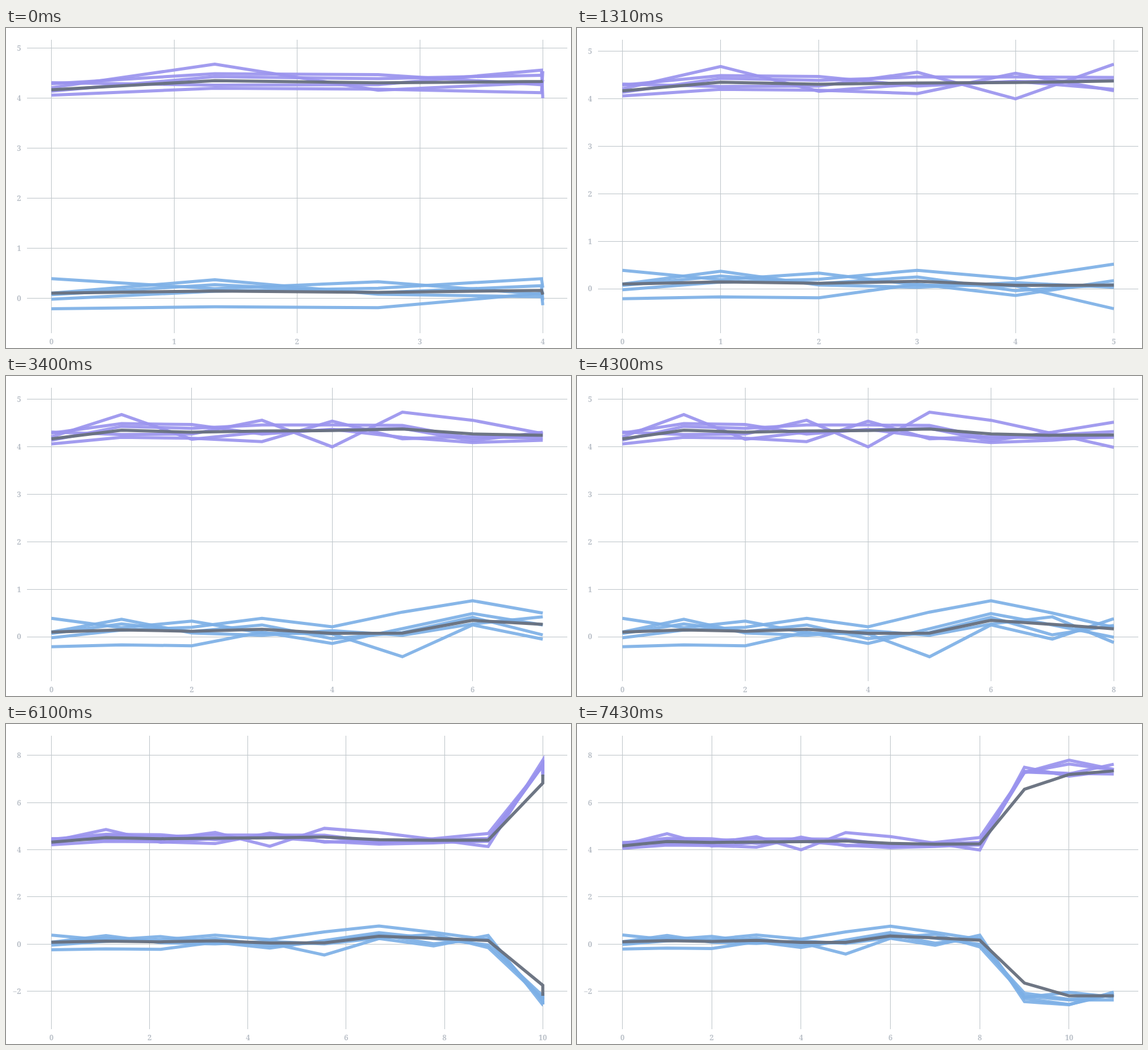
An HTML page that plays this animation: 915 by 518 pixels, repeating every 8000 ms.

```html
<!DOCTYPE html>
<html lang="en">
<head>
<meta charset="utf-8">
<style>
  html, body { margin: 0; width: 100%; height: 100%; overflow: hidden; background: #fff; }
  svg { display: block; }
  text { font: bold 12px "Noto Serif", serif; fill: #b9bfc7; }
  rect { fill: #c1c8cc; shape-rendering: crispEdges; }
  path { fill: none; stroke-width: 5; }
  .high { stroke: #9b94ee; stroke-opacity: .92; }
  .low { stroke: #7db0e6; stroke-opacity: .92; }
  .mean { stroke: #69717f; stroke-opacity: .96; }
</style>
</head>
<body>
<svg id="chart" width="915" height="518"></svg>
<script>
// Values in hundredths, one row per series
const high = [
  [421, 468, 416, 431, 436, 439, 413, 431, 452, 728, 780, 741],
  [429, 449, 447, 427, 437, 420, 409, 414, 424, 728, 764, 738],
  [414, 443, 439, 446, 446, 445, 418, 425, 432, 733, 724, 721],
  [431, 426, 427, 456, 400, 473, 456, 428, 399, 750, 712, 736],
  [406, 420, 418, 411, 454, 417, 422, 418, 420, 730, 722, 763]
];
const low = [
  [39, 19, 33, 8, 6, -42, 25, -5, 38, -244, -257, -203],
  [10, 37, 8, 3, 13, 3, 27, 42, -12, -220, -237, -237],
  [7, 27, 11, 25, -4, 9, 41, 4, 24, -226, -204, -225],
  [-2, 14, 20, 39, 21, 52, 76, 50, 20, -230, -256, -212],
  [-21, -17, -19, 10, -14, 17, 49, 25, -1, -208, -234, -217]
];

// Running average: each new mean counts for three quarters
function smooth(rows, last) {
  return rows[0].map((_, i) => {
    const mean = rows.reduce((sum, row) => sum + row[i], 0) / rows.length;
    return last = .75 * mean + .25 * last;
  });
}

const series = [
  ...high.map(row => ["high", row]), ["mean", smooth(high, 407)],
  ...low.map(row => ["low", row]), ["mean", smooth(low, 20)]
];

const LOOP = 8000, PERIOD = 1021, LEAD = 34, FADE = 250;
const steps = [0, 150, 270, 1010, 1160, 1310, 2060, 2210, 2360, 3110, 3260, 3400,
  4150, 4300, 4450, 5200, 5350, 6100, 6250, 6390, 7140, 7290, 7430];
const LEFT = 73.5, RIGHT = 869.3, TOP = 58.58, BOTTOM = 454.42;
const chart = document.getElementById("chart");

const ease = u => u >= 1 ? 1 : u < .5 ? 4 * u ** 3 : 1 - 4 * (1 - u) ** 3;
const lerp = (a, b, u) => a + (b - a) * u;

function scales(n) {
  const seen = [...high, ...low].flatMap(row => row.slice(0, n + 1));
  const min = Math.min(...seen), max = Math.max(...seen);
  return {
    range: (max - min) / 100,
    x: i => lerp(LEFT, RIGHT, i / n),
    y: v => lerp(BOTTOM, TOP, (v - min) / (max - min))
  };
}

function label(x, y, anchor, value) {
  return `<text x="${x}" y="${y}" text-anchor="${anchor}">${String(value).replace("-", "−")}</text>`;
}

function grid(n, s) {
  let out = "";
  for (let i = 0; i <= n; i += n > 6 ? 2 : 1) {
    const x = s.x(i);
    out += `<rect x="${Math.floor(x)}" y="19" width="1" height="475"/>` + label(x, 512, "middle", i);
  }
  const step = s.range > 8 ? 2 : 1;
  for (let v = -4; v <= 10; v += step) {
    const y = s.y(v * 100);
    if (y < 19 || y > 494) continue;
    out += `<rect x="34" y="${Math.round(y - .5)}" width="875" height="1"/>` + label(24.5, y + 4.3, "end", v);
  }
  return out;
}

function draw(t) {
  const n = 4 + Math.floor((t + LEAD) / PERIOD);
  const u = ease((t + LEAD) % PERIOD / FADE);
  const from = scales(n - 1), to = scales(n);
  const lines = series.map(([kind, row]) => {
    const points = row.slice(0, n + 1).map((v, i) => {
      const k = i === n ? 1 : u; // the newest point is placed at once
      return lerp(from.x(i), to.x(i), k).toFixed(2) + " " + lerp(from.y(v), to.y(v), k).toFixed(2);
    });
    return `<path class="${kind}" d="M${points.join("L")}"/>`;
  });
  chart.innerHTML = grid(n, to) + lines.join("");
}

let shown = -1;
function tick() {
  const t = performance.now() % LOOP;
  const step = steps.findLast(s => s <= t);
  if (step !== shown) draw(shown = step);
  requestAnimationFrame(tick);
}
tick();
</script>
</body>
</html>
```
